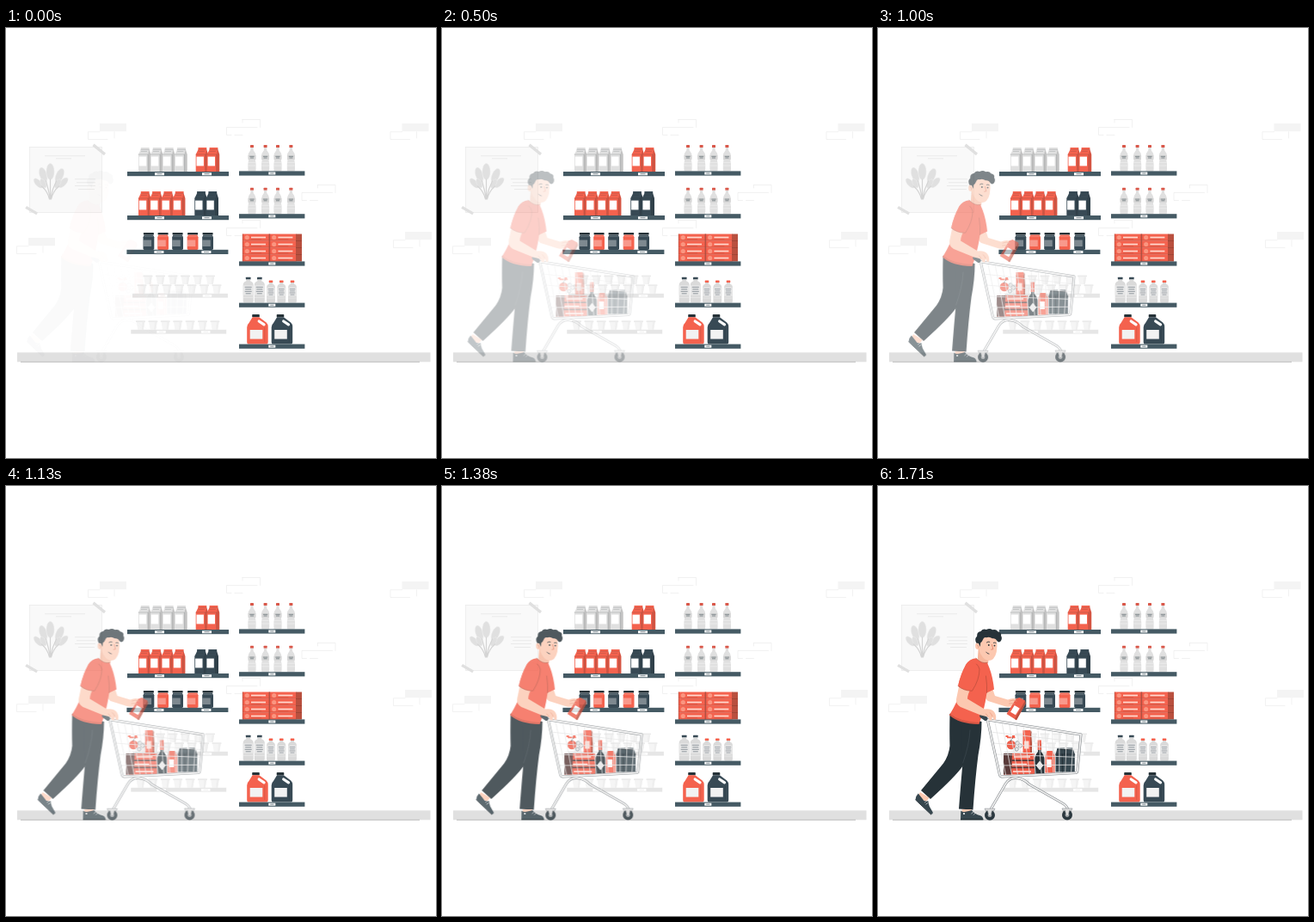
Recreate the animation shown at these times as an HTML page. Size 500x500 px, loop 1750 ms.

```html
<!DOCTYPE html>
<html lang="en">
<head>
<meta charset="utf-8">
<title>Supermarket</title>
<style>
  html, body { margin: 0; width: 100%; height: 100%; overflow: hidden; background: #fff; }
  svg { display: block; width: 100vw; height: 100vh; }
  .red { color: #f4624e; }
  .dark { color: #384a55; }
  .gray { color: #e0e0e0; }
  .line { fill: none; stroke-linecap: round; stroke-linejoin: round; }
  .c { fill: currentColor; }
  #shopper { animation: enter 1750ms infinite; }
  /* 24 steps per second, the first pose held for three */
  @keyframes enter {
    0%, 7.09% { transform: translateX(-19.13px); opacity: .024; animation-timing-function: step-end; }
    7.1% { transform: translateX(-17.73px); opacity: .095; animation-timing-function: steps(39); }
    100% { transform: translateX(.467px); opacity: 1.024; }
  }
</style>
</head>
<body>
<svg viewBox="0 0 500 500">
  <defs>
    <g id="carton">
      <path class="c" d="M0 8 2.8 2.3V0H12.6V2.3L14.4 8V28H0Z"/>
      <path d="M11 8 12.6 2.3 14.4 8V28H11Z" opacity=".13"/>
      <path class="line" d="M2.8 2.3H12.6M0 8H11V28" stroke="#263238" stroke-opacity=".35" stroke-width=".5"/>
      <path d="M3 4.5H10" stroke="#263238" stroke-opacity=".25" stroke-width=".6"/>
      <rect x=".8" y="10.6" width="8.4" height="10.8" fill="#fff"/>
    </g>
    <g id="jar">
      <rect x=".6" width="12" height="2.6" rx=".6" fill="#263238"/>
      <path class="c" d="M1.5 2.6H11.7L13 5.2V18.6Q13 20 11.6 20H1.6Q.2 20 .2 18.6V5.2Z"/>
      <rect x=".4" y="8.5" width="9.4" height="7.5" fill="#fff" opacity=".35"/>
      <path d="M1.5 4.2H11.7" stroke="#fff" stroke-opacity=".3" stroke-width=".8"/>
    </g>
    <g id="cup">
      <path d="M.8 1.6H10.2L8.8 10.5H2.2Z" fill="#f5f5f5"/>
      <rect width="11" height="1.8" rx=".6" fill="#ebebeb"/>
      <path d="M7.4 1.8H10.2L8.8 10.5H6.8Z" fill="#efefef"/>
    </g>
    <g id="water">
      <rect x="-2" width="4" height="3" rx=".5" fill="#d9584a"/>
      <path d="M-1.6 3H1.6V6Q4.6 9.5 4.6 13L4 18 4.6 22V29Q4.6 30.5 3.4 30.5H-3.4Q-4.6 30.5-4.6 29V22L-4 18-4.6 13Q-4.6 9.5-1.6 6Z" fill="#e0e0e0"/>
      <path d="M-4.4 12H4.4V17H-4.4Z" fill="#d6d6d6"/>
      <path d="M-2.6 13.3H2.6M-2 15H2" stroke="#6d777c" stroke-width=".8"/>
      <path d="M-4.2 20.5H4.2M-4.4 24H4.4" stroke="#f0f0f0" stroke-width=".6"/>
    </g>
    <g id="lotion">
      <rect class="c" x="-2.8" width="5.6" height="2.8" rx=".5"/>
      <path d="M-2.4 2.8H2.4V4.4Q6 5.6 6 9V28Q6 29.7 4.5 29.7H-4.5Q-6 29.7-6 28V9Q-6 5.6-2.4 4.4Z" fill="#dadada"/>
      <path d="M-6 9.5H6V21H-6Z" fill="#e8e8e8"/>
      <path d="M-4 11.5H4M-3.5 14H3.5M-4 16.5H4M-3 19H3" stroke="#78828a" stroke-width=".8"/>
      <path d="M-5.8 23.5H5.8" stroke="#f0f0f0" stroke-width=".6"/>
    </g>
    <g id="jug">
      <rect x="6" width="8.6" height="3.2" rx=".8" fill="#263238"/>
      <path class="c" d="M6.4 3.2H14.2L22.5 9.5Q24.5 11.5 24.5 14V32.4Q24.5 34.6 22.3 34.6H2.2Q0 34.6 0 32.4V15Q0 12 2.3 10Z"/>
      <path d="M14 8 19.8 11.8" stroke="#fff" stroke-width="3.2" stroke-linecap="round"/>
      <rect x="3.5" y="18" width="14.6" height="10.6" fill="#f2f2f2"/>
      <path d="M20.6 15V32" stroke="#000" stroke-opacity=".1" stroke-width="1"/>
    </g>
    <g id="pack">
      <rect class="c" width="31" height="8"/>
      <path d="M0 7.7H31M.3 0V8" stroke="#b24a3b" stroke-width=".7"/>
      <circle cx="5.3" cy="4" r="2.6" fill="#fa9580"/>
      <path d="M10 4H27" stroke="#ffd9cf" stroke-width="1.7"/>
      <path d="M10 6.2H22" stroke="#c64a3b" stroke-width=".5"/>
    </g>
    <g id="stack">
      <use href="#pack"/><use href="#pack" y="8"/><use href="#pack" y="16"/><use href="#pack" y="24"/>
    </g>
    <g id="wide">
      <rect class="c" width="118" height="5.2"/>
      <path d="M32 1.2h11v3H32ZM87 1.2h11v3H87Z" fill="#fff"/>
      <path d="M34.5 2.7h6M89.5 2.7h6" stroke="currentColor" stroke-width=".7"/>
    </g>
    <g id="narrow" color="#455a64">
      <rect class="c" width="76.4" height="5.2"/>
      <rect x="34.3" y="1.1" width="8" height="3" fill="#fff"/>
      <path d="M36.2 2.6h4.2" stroke="currentColor" stroke-width=".7"/>
    </g>
    <g id="brick">
      <rect x="14" width="31" height="9.2" fill="#f4f4f4"/>
      <path class="line" d="M14 9.7H.5V18.5H23M31 9.7V17" stroke="#ededed" stroke-width=".7"/>
    </g>
    <g id="bond">
      <path class="line" d="M19 .5H39.5V9.5M19 .5V4M36 9.5H.5V18.5H6M10 18.5H19" stroke="#ebebeb" stroke-width=".7"/>
    </g>
    <g id="wheel">
      <circle r="6" fill="#2b383f"/>
      <circle r="2.4" fill="#a9aeb0"/>
      <path d="M-6-7.6H6L5-5.2H2.6L1 1H-1L-2.6-5.2H-5Z" fill="#dcdcdc" stroke="#7d8387" stroke-width=".5"/>
    </g>
    <path id="tube" d="M125.5 271.5 236 289 231.8 331.5Q231.5 333.5 229.5 333.6L144 338Q142 338 141.5 336L127.5 273M131 376 148.5 346Q153 339 161 339.5 170 340.5 176 347L213 368Q219 371 220.5 375.5"/>
    <ellipse id="leaf" cy="-29" rx="4.7" ry="9.7"/>
  </defs>

  <use href="#brick" x="95" y="111"/>
  <use href="#brick" x="12" y="244"/>
  <use href="#brick" x="446.5" y="111"/>
  <use href="#brick" x="450" y="237"/>
  <use href="#bond" x="256" y="106"/>
  <use href="#bond" x="343.5" y="182"/>
  <use href="#bond" x="256" y="223"/>

  <rect x="13" y="377.3" width="480.5" height="11" fill="#e0e0e0"/>
  <path d="M17 388.3H481" stroke="#a6a6a6" stroke-width=".7"/>

  <!-- poster -->
  <rect x="27.5" y="138.5" width="84" height="76" fill="#f9f9f9" stroke="#ececec" stroke-width=".8"/>
  <path d="M102.5 134.5 116 145.5 114 148.3 100.5 137.3ZM24 207 37 214.5 35.3 217.3 22.3 209.8Z" fill="#e0e0e0"/>
  <path d="M45 148.7H92M58 151.8H76M80 175.7H104M82 179.7H104M80 183.5H104M84 187.5H103" stroke="#e4e4e4" stroke-width=".7"/>
  <g transform="translate(51.5 196)" fill="#e0e0e0" stroke="#f3f3f3" stroke-width=".5">
    <use href="#leaf" transform="rotate(-42) scale(.72)"/>
    <use href="#leaf" transform="rotate(43) scale(.76)"/>
    <use href="#leaf" transform="rotate(-18) scale(.92)"/>
    <use href="#leaf" transform="rotate(24) scale(.92)"/>
    <use href="#leaf"/>
    <use href="#leaf" transform="rotate(-28) scale(.6)"/>
    <use href="#leaf" transform="rotate(30) scale(.6)"/>
    <path class="line" d="M-10-12Q-3-6-1 3M10-12Q3-6 1 3M-5-18Q-2-8 0 3M7-18Q2-8 0 3M0-20V3" stroke="#d4d4d4" stroke-width="1.2"/>
  </g>

  <!-- left shelves -->
  <g class="gray">
    <use href="#carton" x="154" y="139"/><use href="#carton" x="168" y="139"/>
    <use href="#carton" x="182" y="139"/><use href="#carton" x="196.3" y="139"/>
  </g>
  <g class="red">
    <use href="#carton" x="220.7" y="139"/><use href="#carton" x="233.8" y="139"/>
    <use href="#carton" x="154" y="190"/><use href="#carton" x="167.3" y="190"/>
    <use href="#carton" x="180.7" y="190"/><use href="#carton" x="194" y="190"/>
    <use href="#jar" x="176" y="238"/><use href="#jar" x="210.5" y="238"/>
  </g>
  <g class="dark">
    <use href="#carton" x="219.3" y="190"/><use href="#carton" x="232.6" y="190"/>
    <use href="#jar" x="159.3" y="238"/><use href="#jar" x="193" y="238"/><use href="#jar" x="228" y="238"/>
  </g>
  <g color="#455a64">
    <use href="#wide" x="141" y="167"/><use href="#wide" x="141" y="218"/><use href="#wide" x="140.4" y="257.8"/>
  </g>
  <g id="cups"></g>
  <g color="#e6e6e6">
    <use href="#wide" transform="translate(147 308.8) scale(.94 .92)"/>
    <use href="#wide" transform="translate(145.3 350.8) scale(.94 .92)"/>
  </g>

  <!-- right shelves -->
  <use href="#water" x="286" y="136"/><use href="#water" x="301.6" y="136"/>
  <use href="#water" x="316" y="136"/><use href="#water" x="331.4" y="136"/>
  <use href="#water" x="286" y="185.8"/><use href="#water" x="301.6" y="185.8"/>
  <use href="#water" x="316" y="185.8"/><use href="#water" x="331.4" y="185.8"/>
  <g class="red">
    <use href="#stack" x="275" y="239.5"/><use href="#stack" x="306.4" y="239.5"/>
    <path d="M337 239.5h7v32h-7Z" fill="#b9503f"/>
    <path d="M337 247.5h7m-7 8h7m-7 8h7" stroke="#923e30" stroke-width=".6"/>
    <path d="M306.2 239.5v32" stroke="#a34436" stroke-width="1"/>
  </g>
  <g class="dark"><use href="#lotion" x="281.7" y="289.8"/><use href="#lotion" x="294.8" y="289.8"/></g>
  <g class="red">
    <use href="#lotion" transform="translate(308 293.6) scale(.82 .87)"/>
    <use href="#lotion" transform="translate(320.3 293.6) scale(.82 .87)"/>
    <use href="#lotion" transform="translate(333 293.6) scale(.82 .87)"/>
    <use href="#jug" x="280.2" y="333"/>
  </g>
  <use class="dark" href="#jug" x="308.7" y="333"/>
  <use href="#narrow" x="271" y="166.4"/><use href="#narrow" x="271" y="216.2"/>
  <use href="#narrow" x="271" y="271.4"/><use href="#narrow" x="271" y="319.6"/>
  <use href="#narrow" x="271" y="367.6"/>

  <g id="shopper">
    <!-- far arm and carton -->
    <path d="M122 234 131 231Q134 237 136 244L151 248.5Q156 246 161 247.5L165 250 159 255Q152 258 147 256L128 250Q123 247 122 234Z" fill="#fcc8b0"/>
    <path d="M160.5 247.5 164.5 246 171 249.5 171.5 253 161 272.3 149.5 265Z" fill="#ee5e4b"/>
    <path d="M171 249.5 171.5 253 161 272.3 159 270.9Z" fill="#b9503f"/>
    <path d="M158.7 255 164.7 258.5 160 266.3 154 262.7Z" fill="#fff"/>
    <path class="line" d="M153 250Q157 248 161 250M152.5 253Q156 252 159 253.4" stroke="#e59a80" stroke-width=".7"/>

    <!-- legs -->
    <path d="M83.5 265Q83 286 83.5 302 82.5 313 76 322.5L50 354 61 364Q91 337 99 325L112 275Z" fill="#263238"/>
    <path d="M49 356 46.5 360.5 56 367.5 59.5 362.5Z" fill="#fcc8b0"/>
    <path d="M46.8 357.5Q43.4 361 43.6 364.5L61.5 381.8Q64 382 63.8 379.5L59.8 372.5Q58.5 369 58.6 366.5L53.5 366Z" fill="#37474f"/>
    <path class="line" d="M43.7 365 61.7 382" stroke="#263238" stroke-width="1"/>
    <path class="line" d="M54.5 367.8 57 366M55.8 370 58.2 368.3" stroke="#fff" stroke-width=".6"/>
    <path d="M83.5 264 120.5 274Q120.5 292 116.5 313 113 340 110.5 376.5L94 375.5Q96.5 343 98.5 322L97 280Z" fill="#263238"/>
    <path class="line" d="M107 284Q106 302 98.7 322" stroke="#455058" stroke-width=".5"/>
    <path d="M97.5 376H108.5V380H97.5Z" fill="#fcc8b0"/>
    <path d="M96.3 377.5Q98 380 104 378.3L109 377Q112 381.5 119 383.3 122.5 384.6 122.3 388.2H96Z" fill="#37474f"/>
    <path d="M96 387.6H122.3" stroke="#263238" stroke-width="1.3"/>
    <path class="line" d="M108.8 381 110.5 379M111.3 382.3 113 380.4" stroke="#fff" stroke-width=".6"/>
    <circle cx="100" cy="381" r="1" fill="#fff"/>

    <!-- head -->
    <path d="M116.8 188 115.6 204Q121 211 128 206L129 199Z" fill="#f6b79c"/>
    <path d="M118 176Q128 168 138 177 139 186 137.8 193 135.5 203 128.5 203 121.5 202 117.8 192Z" fill="#fcc8b0"/>
    <ellipse cx="116" cy="186" rx="2.9" ry="3.9" fill="#fcc8b0"/>
    <path class="line" d="M115 184.5Q117.3 185 116.8 188" stroke="#dc8870" stroke-width=".6"/>
    <path d="M114.3 182.5Q111.8 178 115.2 174.5 114.8 169.5 119.5 169 122 165.5 126 167 130 164.8 133 167.3 137.5 166 139.3 169.3 144 170.2 143 174 145 177.5 142.6 180.5 140 182.8 138.2 179.8 137 176.5 133 177.3 129.5 174.8 126 176.3 123 175.2 121.8 179 120.6 182 119.3 182.3L118.6 187 117 183Z" fill="#263238"/>
    <path class="line" d="M126.3 182Q128 180.3 129.8 181.3M134.3 182.3Q136 181.4 137.2 182.6M125.8 193.2Q126.6 195 129 195.2" stroke="#263238" stroke-width=".8"/>
    <path class="line" d="M132.4 184.5 133.8 189.8 131.6 190.1" stroke="#e07a60" stroke-width=".8"/>
    <circle cx="128.8" cy="185" r=".9" fill="#263238"/><circle cx="135.5" cy="185.6" r=".9" fill="#263238"/>

    <!-- shirt -->
    <path d="M114 200.3Q106 201 102 208 96 219 93.5 231L98 234Q92 252 83.5 265.5 95 275.5 117.5 276.3 123.5 262 126.5 240.5L135 236.5Q133.5 222 129.5 211.5L127 205.5Q120 207 114 200.3Z" fill="#f4624e"/>
    <path class="line" d="M114 200.3Q120 207 127 205.5M125.5 221Q127.2 232 126.5 240.5M83.5 265.5Q95 275.5 117.5 276.3" stroke="#ad4838" stroke-width=".6"/>
    <path d="M83.8 265Q95 274 117.8 275L117.2 277Q94 276.5 83 266.5Z" fill="#d95644"/>

    <!-- goods -->
    <path d="M150 292.3h9.5M148.5 291h3M156 291h3" stroke="#f4624e" stroke-width="1.8"/>
    <circle cx="154.8" cy="301" r="5.2" fill="#ee5e4b"/>
    <path class="line" d="M154.8 296.5Q154.5 294 156.5 293" stroke="#263238" stroke-width=".9"/>
    <g fill="#e8e8e8" stroke="#707b80" stroke-width=".6">
      <circle cx="162" cy="299" r="2.3"/><circle cx="165.3" cy="302" r="2.3"/><circle cx="161.3" cy="306" r="2.1"/>
    </g>
    <path d="M168.5 284H177V310H168.5Z" fill="#f4624e"/>
    <path d="M177 284 179 286V310H177Z" fill="#b9503f"/>
    <path d="M170 296.5h5.5v9H170Z" fill="#ffd9d0"/>
    <path d="M146 311H182V335.5H146Z" fill="#ee5e4b"/>
    <path d="M146 311H156L155 335.5H146ZM146 318.2H182V320H146ZM146 326.5H182V328.2H146Z" fill="#5a3b3a"/>
    <path d="M158 315H177M156 323.5H173M157 332H178" stroke="#ffe3dc" stroke-width="1.7"/>
    <path d="M186 300H189.5V309Q193.5 313 193.5 318V334.5H182.3V318Q182.3 313 186 309Z" fill="#263238"/>
    <path d="M185.7 295.5H189.8V307H185.7Z" fill="#ee5e4b"/>
    <path d="M188 319.5 192.3 325 188 330.5 183.7 325Z" fill="#e8e8e8"/>
    <path d="M194.5 314 196.5 308H203L205.5 314V333.5H194.5Z" fill="#f4624e"/>
    <path d="M195.8 318h6v9h-6Z" fill="#fff"/>
    <path d="M206.5 312 208.5 304.5H217L218 307 219.5 304.5H226.5L228.8 312V332.5H206.5Z" fill="#37474f"/>
    <path class="line" d="M206.5 312H228.8M218 307V332M214.5 312V332M208.5 306.5H226.5" stroke="#1d272c" stroke-width=".7"/>

    <!-- cart -->
    <path id="mesh" class="line" stroke="#e4e4e4" stroke-width=".8"/>
    <g class="line">
      <use href="#tube" stroke="#80868a" stroke-width="2.9"/>
      <use href="#tube" stroke="#ededed" stroke-width="1.8"/>
    </g>
    <use href="#wheel" x="130" y="382.7"/>
    <use href="#wheel" x="220" y="382.5"/>
    <path class="line" d="M120.8 267.5 125 270.3" stroke="#37474f" stroke-width="5"/>

    <!-- near arm -->
    <path d="M94.5 231 107.5 236Q104 243 104 247.5L124 259.5Q131 258.5 135 262.5 138 267 137 271.5L134.8 272.3 133 268 132.3 272.5 129.5 272 128 268.5 119.5 266.5 96 257Q90.5 254 91 248Z" fill="#fcc8b0"/>
    <path class="line" d="M133 268Q132.5 265 130 263.5M128 268.5Q127.5 266 125.5 265" stroke="#e59a80" stroke-width=".7"/>
    <path d="M103 206.5Q96 219 93 232.5 100 238.5 109.5 238.2 117 224 117.5 213 113 203 103 206.5Z" fill="#f4624e"/>
    <path class="line" d="M93 232.5Q100 238.5 109.5 238.2 118 225 118 213 117 209 114.5 207" stroke="#ad4838" stroke-width=".6"/>
  </g>
</svg>
<script>
  const lerp = (a, b, k) => a.map((v, i) => v + (b[i] - v) * k);
  const seg = (a, b) => `M${a}L${b}`;

  const [tl, tr, br, bl] = [[127.5, 273], [236, 289], [231.5, 333], [142, 338]];
  let d = '';
  for (let i = 1; i < 13; i++) d += seg(lerp(tl, tr, i / 13), lerp(bl, br, i / 13));
  for (let i = 1; i < 5; i++) d += seg(lerp(tl, bl, i / 5), lerp(tr, br, i / 5));
  document.getElementById('mesh').setAttribute('d', d);

  const row = (n, x, y, step) =>
    Array.from({ length: n }, (_, i) => `<use href="#cup" x="${x + i * step}" y="${y}"/>`).join('');
  document.getElementById('cups').innerHTML =
    row(6, 159.5, 287.5, 14.5) + row(7, 152.5, 298.3, 14.5) + row(7, 151, 340.3, 14.4);
</script>
</body>
</html>
```
